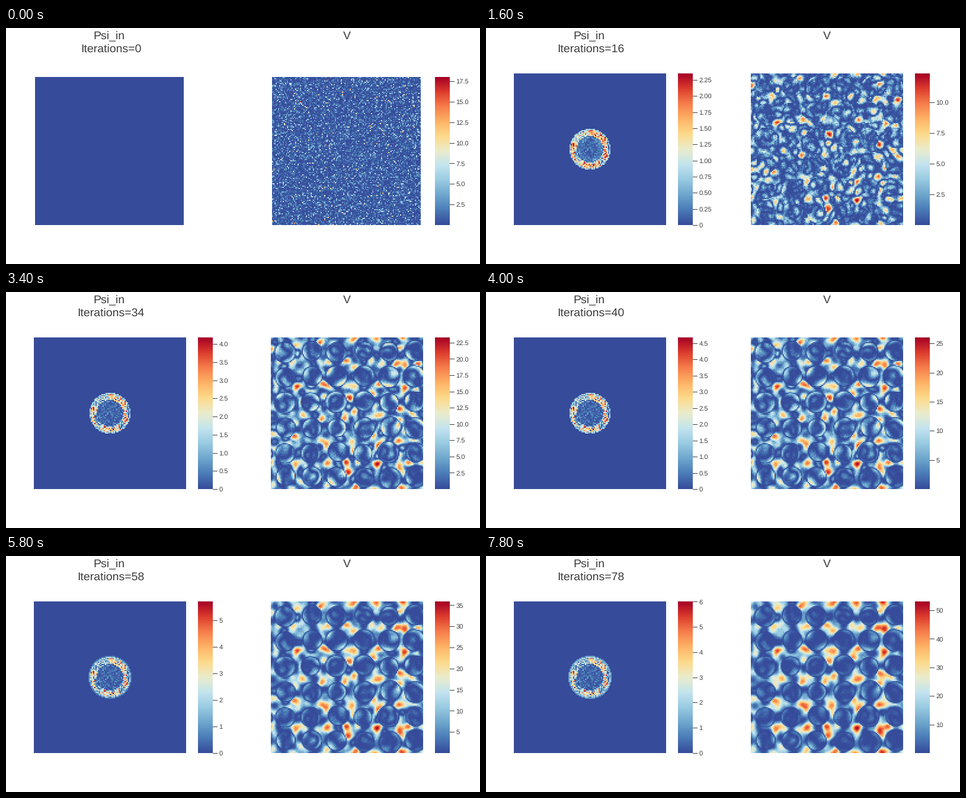
These frames come from a looping animation (800 px wide and 400 px high, 8000 ms). A matplotlib script:

```python
import numpy as np
import matplotlib.pyplot as plt
from matplotlib.animation import FuncAnimation
from matplotlib.colors import LinearSegmentedColormap

W, H, DPI = 800, 400, 100
N = 128
FRAMES, STEP_MS = 40, 200
INK = "#3c3c3c"
plt.rcParams["font.family"] = "Liberation Sans"
plt.rcParams["text.hinting"] = "none"

SUNSET = LinearSegmentedColormap.from_list("sunset", [
    "#364B9A", "#4A7BB7", "#6EA6CD", "#98CAE1", "#C2E4EF", "#EAECCC",
    "#FEDA8B", "#FDB366", "#F67E4B", "#DD3D2D", "#A50026"])

rng = np.random.default_rng(11)
gy, gx = np.mgrid[0:N, 0:N] + 0.5


def ramp(t, start, end):
    return np.clip((t - start) / (end - start), 0, 1)


def psi_max(it):
    return 6.01 * np.sin(np.pi / 2 * min(1, (it + 3.7) / 77))


def v_max(it):
    return np.interp(it, [0, 6, 16, 34, 48, 68, 78],
                     [18, 10.75, 12.36, 23.3, 29.7, 42.1, 53.1])


def band_noise(k0, width):
    """Unit-variance random field limited to a ring of spatial frequencies."""
    f = np.fft.fftfreq(N)
    k = np.hypot(f[:, None], f[None, :])
    spec = np.fft.fft2(rng.standard_normal((N, N)))
    field = np.fft.ifft2(spec * np.exp(-((k - k0) / width) ** 2)).real
    return field / field.std()


def make_atoms():
    """Lattice of tilted spots, strongest in one column, weak at the sides."""
    total = np.zeros((N, N))
    for j in range(7):
        for i in range(7):
            peak = rng.uniform(0.45, 0.8)
            peak *= 0.5 if i in (0, 6) else 1.3 if i == 5 else 1
            dx = gx - (1.5 + 21.8 * i) + rng.uniform(-0.6, 0.6)
            dy = gy - (1.5 + 21.2 * j) + rng.uniform(-0.6, 0.6)
            a = -np.pi / 4 + rng.normal(0, 0.45)
            u = dx * np.cos(a) + dy * np.sin(a)
            v = dy * np.cos(a) - dx * np.sin(a)
            total += peak * np.exp(-(u / 6.4) ** 2 - (v / 4.6) ** 2)
    return np.sqrt(total)


def make_discs():
    """Round patches between atoms, the lobes inside them, dark seams around."""
    mask, lobes, seam = np.zeros((N, N)), np.zeros((N, N)), np.ones((N, N))
    for j in range(6):
        for i in range(6):
            dx = gx - (12.4 + 21.8 * i) + rng.uniform(-1, 1)
            dy = gy - (12.1 + 21.2 * j) + rng.uniform(-1, 1)
            rad = np.hypot(dx, dy) / rng.uniform(7.6, 9.2)
            inside = rad < 1
            turn = np.arctan2(dy, dx) - rng.uniform(0, 2 * np.pi)
            lobe = rng.uniform(1.4, 3) * rad ** 2 * np.cos(turn)
            mask[inside] = 1
            lobes[inside] = lobe[inside]
            seam = np.minimum(seam, 0.2 + np.abs(rad - 1) / 0.15)
    return mask, lobes, seam


white = rng.standard_normal((N, N))
fine = band_noise(0.10, 0.10)
swirl = band_noise(0.09, 0.035)
inner = band_noise(0.07, 0.03)
speck = rng.standard_normal((N, N))
patch = band_noise(0.08, 0.06)
atoms = make_atoms()
disc_mask, disc_lobes, disc_seam = make_discs()
radius = np.hypot(gx - N / 2, gy - N / 2)


def potential(it):
    """Squared field: white noise, then swirls, then a lattice of atoms."""
    d = ramp(it, 4, 30)
    wave = ramp(it, 0, 14)
    outside = wave * swirl + 0.09 * it * atoms
    within = wave * (0.6 * inner + disc_lobes)
    mask = d * disc_mask
    amp = ((1 - mask) * outside + mask * within) * (1 - d + d * disc_seam)
    amp += (0.12 + 0.88 * np.exp(-it / 6)) * white
    amp += 0.8 * it / 5 * np.exp(1 - it / 5) * fine
    v = amp ** 2
    v /= np.quantile(v, 0.97)
    v /= 1 + 0.8 * ramp(it, 0, 16) * v
    return v / v.max()


def probe(it):
    """Speckled ring around a dim core."""
    if it == 0:
        return np.zeros((N, N))
    level = 0.41 + 0.43 * np.exp(-it / 18)
    grain = 0.23 - 0.13 * np.exp(-it / 10)
    edge = np.clip(1.15 - np.abs(radius - 13.6) / 6, 0, 1)
    band = np.abs(level * edge + grain * (speck + 0.6 * patch))
    glow = 0.3 * np.exp(-(it / 12) ** 2) * np.exp(-((radius - 9.2) / 2) ** 2)
    core = np.abs(0.05 + 0.07 * speck) + glow * (1 + 0.5 * patch)
    rim = 0.3 + 0.08 * speck
    halo = 0.18 * ramp(it, 40, 70)
    out = np.select([radius < 10.8, radius < 16.1, radius < 17.1, radius < 18],
                    [core, band, rim, halo], 0)
    return np.clip(out, 0, 1)


def tick_step(top):
    """Smallest round step that gives fewer than ten ticks."""
    for power in range(-3, 4):
        for base in (1, 2.5, 5):
            step = base * 10.0 ** power
            if top / step < 10:
                return step


def text(x, y, s, size, ha="left"):
    ax.text(x, y, s, size=size, ha=ha, va="baseline", color=INK)


def heatmap(data, x0, x1, top):
    ax.imshow(data, cmap=SUNSET, vmin=0, vmax=1, extent=(x0, x1, 334, top),
              interpolation="nearest", aspect="auto")


def colorbar(x, top, vmax, first_tick):
    heatmap(np.linspace(1, 0, 256)[:, None], x, x + 25, top)
    step = tick_step(vmax)
    digits = next(k for k in range(4) if round(step, k) == step)
    for n in range(first_tick, int(vmax / step) + 1):
        y = 334 - (334 - top) * n * step / vmax
        ax.plot([x + 24.5, x + 32], [y, y], color=INK, lw=0.72)
        text(x + 35.5, y + 4, f"{n * step:.{digits}f}" if n else "0", 8)


def draw(i):
    it = 2 * i
    ax.cla()
    ax.axis("off")
    top, x0, x1 = (77, 47, 304) if i else (83, 49, 300)
    heatmap(probe(it), x0, x1, top)
    heatmap(potential(it), x0 + 400, x1 + 400, top)
    if i:
        colorbar(324, top, psi_max(it), 0)
    colorbar(724, top, v_max(it), 1)
    text(174, 19, "Psi_in", 14, "center")
    text(177, 41, f"Iterations={it}", 14, "center")
    text(575, 19, "V", 14, "center")
    ax.set_xlim(0, W)
    ax.set_ylim(H, 0)
    return []


fig = plt.figure(figsize=(W / DPI, H / DPI), dpi=DPI, facecolor="white")
ax = fig.add_axes([0, 0, 1, 1])
anim = FuncAnimation(fig, draw, frames=FRAMES, init_func=lambda: draw(0),
                     interval=STEP_MS, repeat=True, repeat_delay=0, blit=False)
plt.show()
```
